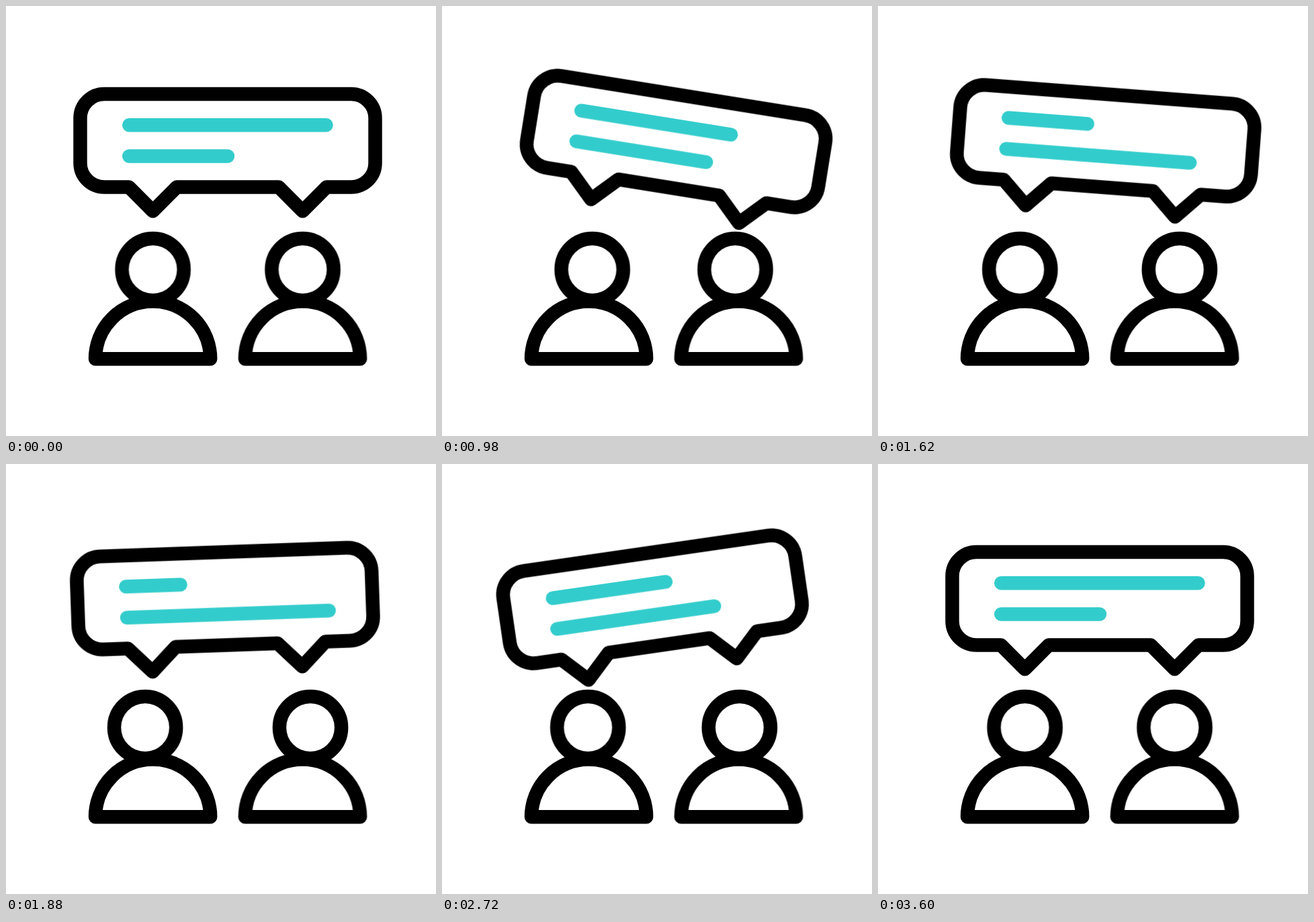
Write an HTML page that moves like this. It is 640x640 px and loops after 3.62 s.

```html
<!DOCTYPE html>
<html lang="en">
<head>
<meta charset="utf-8">
<title>Conversation</title>
<style>
  html, body { margin: 0; width: 100%; height: 100%; overflow: hidden; background: #fff; }
  svg { display: block; width: 100vw; height: 100vh; }

  .ink { fill: none; stroke: #000; stroke-width: 20.48; stroke-linejoin: round; stroke-linecap: round; }

  /* 3600 ms of motion plus a 20 ms rest */
  .bubble, .bar, .head {
    animation: 3620ms cubic-bezier(.3333, 0, .6667, 1) infinite;
  }

  .bubble { animation-name: tilt; transform-origin: 330px 316.8px; }
  @keyframes tilt {
    0%, 99.448%, 100% { transform: rotate(0deg); }
    33.149% { transform: rotate(10deg); }
    66.298% { transform: rotate(-10deg); }
  }

  .bar { animation-name: write; fill: #3cc; width: var(--from); }
  .first { --from: 313.8px; --to: 90.6px; }
  .second { --from: 167.2px; --to: 329.4px; }
  @keyframes write {
    0%, 33.149%, 66.298%, 99.448%, 100% { width: var(--from); }
    16.575%, 49.724%, 82.873% { width: var(--to); }
  }

  .head { animation-name: sway; --lean: -12.8px; }
  .right .head { --lean: 12.8px; }
  @keyframes sway {
    0%, 99.448%, 100% { transform: translateX(0px); }
    16.575%, 49.724%, 82.873% { transform: translateX(var(--lean)); }
    33.149%, 66.298% { transform: translateX(calc(-1 * var(--lean))); }
  }
</style>
</head>
<body>
<svg viewBox="0 0 640 640">
  <g class="ink">
    <g transform="translate(218.6 0)">
      <path d="M-85.6 525.2a85.6 85.6 0 0 1 171.2 0z"/>
      <circle class="head" cy="392.2" r="46.1"/>
    </g>
    <g class="right" transform="translate(441.5 0)">
      <path d="M-85.6 525.2a85.6 85.6 0 0 1 171.2 0z"/>
      <circle class="head" cy="392.2" r="46.1"/>
    </g>
  </g>
  <g class="bubble">
    <path class="ink" d="M146.3 131H513.7a35.8 35.8 0 0 1 35.8 35.8V233.8a35.8 35.8 0 0 1 -35.8 35.8H477.1l-35.6 35.6l-35.6 -35.6H254.2l-35.6 35.6l-35.6 -35.6H146.3a35.8 35.8 0 0 1 -35.8 -35.8V166.8a35.8 35.8 0 0 1 35.8 -35.8z"/>
    <rect class="bar first" x="173" y="167" height="20.48" rx="10.24"/>
    <rect class="bar second" x="173" y="213.3" height="20.48" rx="10.24"/>
  </g>
</svg>
</body>
</html>
```
